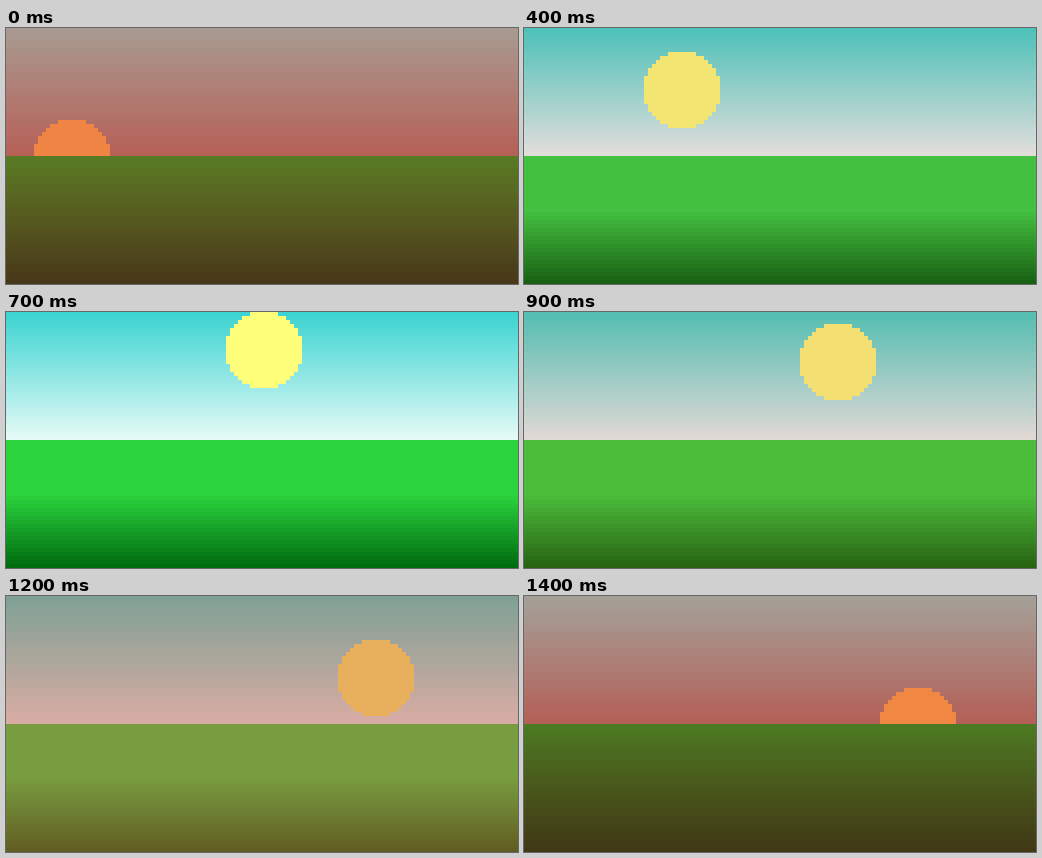
An HTML page with a canvas for the animation above (1500 ms loop, 512 by 256 pixels).

```html
<!DOCTYPE html>
<html lang="en">
<head>
<meta charset="utf-8">
<title>Sunrise to sunset</title>
<style>
  html, body { margin: 0; width: 100%; height: 100%; overflow: hidden; }
  canvas { display: block; width: 512px; height: 256px; image-rendering: pixelated; }
</style>
</head>
<body>
<canvas id="scene" width="128" height="64"></canvas>
<script>
const ctx = document.getElementById('scene').getContext('2d');
const STEP = 100, STEPS = 15, HORIZON = 32, SLOPE = 45;

// Sun centre in cells; colours: sky top, sky bottom, field top, middle, bottom, sun
const keys = [
  { at: 0,  x: 16, y: 32, c: 'a89a90 b66058 587a24 585e20 48381a f08444' },
  { at: 2,  x: 23, y: 22, c: '6ca49a dcb8b0 68a43c 68a43c 4c5c1a e8be66' },
  { at: 5,  x: 47, y: 12, c: '40d0c8 e4f0f0 32d042 32d042 006410 f8f878' },
  { at: 7,  x: 64, y: 9,  c: '3cd4d2 e4faf6 2cd43e 2cd43e 006c10 fffe7a' },
  { at: 9,  x: 78, y: 12, c: '56beb2 e0d8d4 4cbe3c 4cbe3c 286412 f4e072' },
  { at: 12, x: 92, y: 20, c: '80a094 d8aca4 789c40 789c40 625e22 e8b05c' },
  { at: 14, x: 98, y: 32, c: 'a4a098 b46058 4c7a22 4a5c1c 403814 f08844' }
].map(k => ({ ...k, c: k.c.split(' ').map(parse) }));

function parse(hex) {
  return [0, 2, 4].map(i => parseInt(hex.slice(i, i + 2), 16));
}
const mix = (a, b, p) => a.map((v, i) => v + (b[i] - v) * p);
const css = c => `rgb(${c.map(Math.round)})`;

function slope(i, axis) {
  const a = keys[Math.max(i - 1, 0)], b = keys[Math.min(i + 1, keys.length - 1)];
  return (b[axis] - a[axis]) / (b.at - a.at);
}

// Cubic curve between two keys
function curve(i, p, axis) {
  const a = keys[i], b = keys[i + 1], d = b.at - a.at, q = 1 - p;
  return q * q * (1 + 2 * p) * a[axis] + p * p * (3 - 2 * p) * b[axis]
    + d * p * q * (q * slope(i, axis) - p * slope(i + 1, axis));
}

function row(y, color) {
  ctx.fillStyle = css(color);
  ctx.fillRect(0, y, 128, 1);
}

function sun(cx, cy, color) {
  ctx.fillStyle = css(color);
  for (let dy = -9; dy <= 9; dy++) {
    const half = Math.floor(Math.sqrt(9.5 * 9.5 - dy * dy));
    if (cy + dy < HORIZON) ctx.fillRect(cx - half, cy + dy, half * 2 + 1, 1);
  }
}

function draw(step) {
  let i = 0;
  while (i < keys.length - 2 && step >= keys[i + 1].at) i++;
  const a = keys[i], b = keys[i + 1];
  const p = (step - a.at) / (b.at - a.at);
  const [skyTop, skyLow, top, mid, low, glow] = a.c.map((c, n) => mix(c, b.c[n], p));

  for (let y = 0; y < HORIZON; y++) row(y, mix(skyTop, skyLow, y / (HORIZON - 1)));
  for (let y = HORIZON; y < 64; y++) {
    row(y, y < SLOPE
      ? mix(top, mid, (y - HORIZON) / (SLOPE - HORIZON))
      : mix(mid, low, (y - SLOPE) / (63 - SLOPE)));
  }
  sun(Math.round(curve(i, p, 'x')), Math.round(curve(i, p, 'y')), glow);
}

let start = null, last = -1;
function tick(now) {
  if (start === null) start = now;
  const step = Math.floor((now - start) / STEP) % STEPS;
  if (step !== last) draw(last = step);
  requestAnimationFrame(tick);
}
draw(0);
requestAnimationFrame(tick);
</script>
</body>
</html>
```
